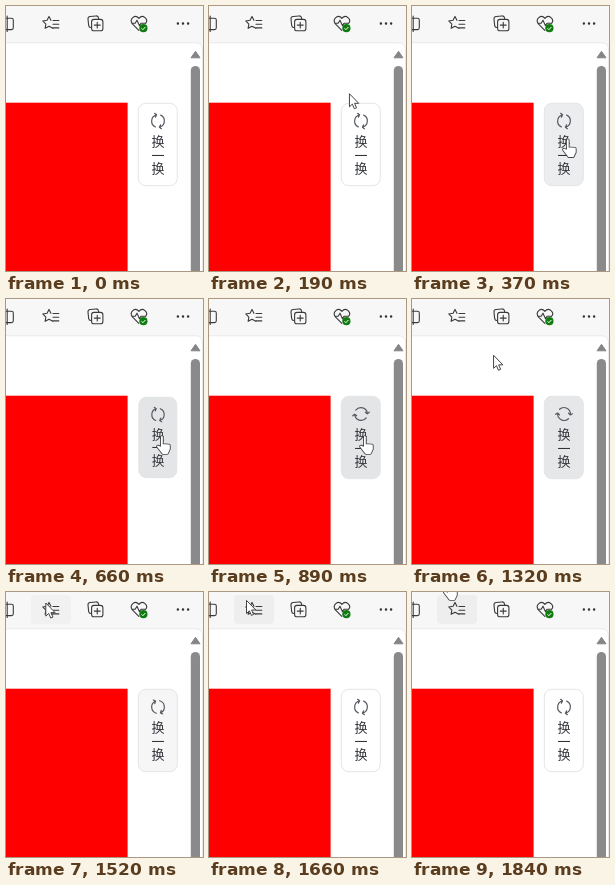
An HTML page that plays this animation: 197x265 px, repeating every 1940 ms.

```html
<!DOCTYPE html>
<html lang="zh">
<head>
<meta charset="utf-8">
<title>换一换</title>
<style>
html, body { margin: 0; width: 100%; height: 100%; overflow: hidden; background: #f7f7f7; }
svg { display: block; width: 100vw; height: 100vh; }
.line { fill: none; stroke: #3a3a3a; stroke-width: 1.1; stroke-linecap: round; stroke-linejoin: round; }
.label { font: 13px "Noto Sans CJK SC", "Noto Sans CJK", sans-serif; fill: #303338; text-anchor: middle; }
#roll { fill: none; stroke: #565a60; stroke-width: 1.2; stroke-linecap: round; stroke-linejoin: round; }
#arrow { fill: #fff; stroke: #444; stroke-linejoin: round; }
#hand { stroke-linejoin: round; }
</style>
</head>
<body>
<svg viewBox="0 0 197 265" preserveAspectRatio="none">
  <rect width="197" height="265" fill="#f7f7f7"/>
  <rect id="starHover" x="25" y="3" width="40" height="29" rx="4" fill="#eee"/>

  <!-- toolbar -->
  <g class="line">
    <rect x="-8" y="12.2" width="15.3" height="11.4" rx="1.8"/>
    <path d="M1.2 10V25.5"/>
    <path id="star"/>
    <path id="bars"/>
    <rect x="82.3" y="10.2" width="10.6" height="11" rx="2.4" transform="rotate(-6 87.6 15.7)"/>
    <rect x="85.6" y="13.4" width="11.3" height="11.4" rx="2.4" fill="#f7f7f7"/>
    <path d="M91.25 16.2V22M88.3 19.1H94.2"/>
    <path d="M132.8 24.3L126.4 17.8C122.8 13.2 129 7.8 132.9 12.3C136.8 7.8 143 13.2 139.6 17.4M125.8 17.2H129.2L131 14.2L133.4 19.6L135 17.2H139.4"/>
  </g>
  <circle cx="137.4" cy="22.2" r="4.1" fill="#107c10"/>
  <path d="M135.5 22.3L136.9 23.7L139.4 21" fill="none" stroke="#fff"/>
  <path d="M171.9 17.4H183" stroke="#333" stroke-width="2.5" stroke-linecap="round" stroke-dasharray="0 5.1"/>

  <!-- page -->
  <path d="M-2 36.8H189.5Q196.5 36.8 196.5 44V267H-2Z" fill="#fff" stroke="#e9e9e9"/>
  <rect y="96.7" width="121.6" height="169" fill="#f00"/>
  <path d="M189.5 45.3L194 51.8H185Z" fill="#858585" stroke="#858585" stroke-linejoin="round"/>
  <rect x="184.8" y="60" width="9.2" height="220" rx="4.6" fill="#8a8a8a"/>

  <g id="button">
    <rect id="face" x="132.3" y="97.3" width="39" height="82.4" rx="7.5" stroke="#e3e5e7"/>
    <g id="roll">
      <path id="arc" d="M149.3 120.9A6.5 6.5 0 0 1 150.4 108.8M148.6 107.3L150.6 108.8L149.4 111.1"/>
      <use href="#arc" transform="rotate(180 152 115)"/>
    </g>
    <g class="label">
      <text x="152" y="140">换</text>
      <text x="152" y="153.6">一</text>
      <text x="152" y="167.2">换</text>
    </g>
  </g>

  <g id="cursor">
    <path id="arrow" d="M.5 .5V13.6L3.4 10.9L5.4 15.5L7.6 14.6L5.6 10.1H9.8Z"/>
    <g id="hand" transform="translate(-6 -1)">
      <path id="palm" d="M5.9 2V10L12.9 10.5V14L11 18H7L2 11.5L5.9 13Z" stroke="#444" stroke-width="3.6"/>
      <path id="skin" fill="#fff" stroke="#fff" stroke-width="1.8"/>
    </g>
  </g>
</svg>
<script>
const LOOP = 1940;
const $ = id => document.getElementById(id);
const set = (id, name, value) => $(id).setAttribute(name, value);
const show = (id, on) => set(id, "opacity", on ? 1 : 0);

// Progress from 0 to 1 between two times
const ramp = (t, from, to) => Math.min(1, Math.max(0, (t - from) / (to - from)));
const pulse = (t, on, onEnd, off, offEnd) => ramp(t, on, onEnd) - ramp(t, off, offEnd);
const mix = (a, b, k) => a + (b - a) * k;
const easeOut = (k, power) => 1 - (1 - k) ** power;

const star = Array.from({ length: 10 }, (_, i) => {
  const r = i % 2 ? 3.3 : 6.6, a = i * Math.PI / 5 - Math.PI / 2;
  return [43 + r * Math.cos(a), 17 + r * Math.sin(a)];
});
// The lower right arm is left open for the bars
set("star", "d", "M" + [...star.slice(4), ...star.slice(0, 2)].join("L"));
set("bars", "d", [0, 1, 2].map(i => `M47 ${14.5 + i * 3.7}H52.8`).join(""));
set("skin", "d", $("palm").getAttribute("d"));

const start = { x: 38, y: 2 }, press = { x: 156, y: 137 }, fav = { x: 37, y: 8 };

function pointer(t) {
  if (t < 1180) {
    const k = ramp(t, 30, 440);
    return [mix(start.x, press.x, easeOut(k, 4)), mix(start.y, press.y, easeOut(k, 2))];
  }
  const back = easeOut(ramp(t, 1180, 1610), 2.5);
  return [mix(press.x, fav.x, back), mix(press.y, fav.y, back) - 18 * ramp(t, 1660, 1840)];
}

const spin = k => 720 * easeOut(k ** 1.4, 3);

function draw(t) {
  const [x, y] = pointer(t);
  const onButton = x > 132 && y > 97;
  const isHand = onButton || t > 1670;
  set("cursor", "transform", `translate(${x} ${y})`);
  show("cursor", t >= 60);
  show("hand", isHand);
  show("arrow", !isHand);

  const pressed = pulse(t, 450, 540, 570, 750) + pulse(t, 1000, 1080, 1120, 1270);
  set("button", "transform", `translate(152 138.5) scale(${1 - 0.05 * pressed}) translate(-152 -138.5)`);
  set("roll", "transform", `rotate(${spin(ramp(t, 570, 1080)) + spin(ramp(t, 1110, 1610))} 152 115)`);

  const hover = pulse(t, 230, 430, 1300, 1630);
  set("face", "fill", `rgb(${[227, 229, 231].map(c => mix(255, c, hover))})`);
  set("starHover", "opacity", ramp(t, 1450, 1560));
}

const begin = performance.now();
function tick() {
  draw((performance.now() - begin) % LOOP);
  requestAnimationFrame(tick);
}
tick();
</script>
</body>
</html>
```
